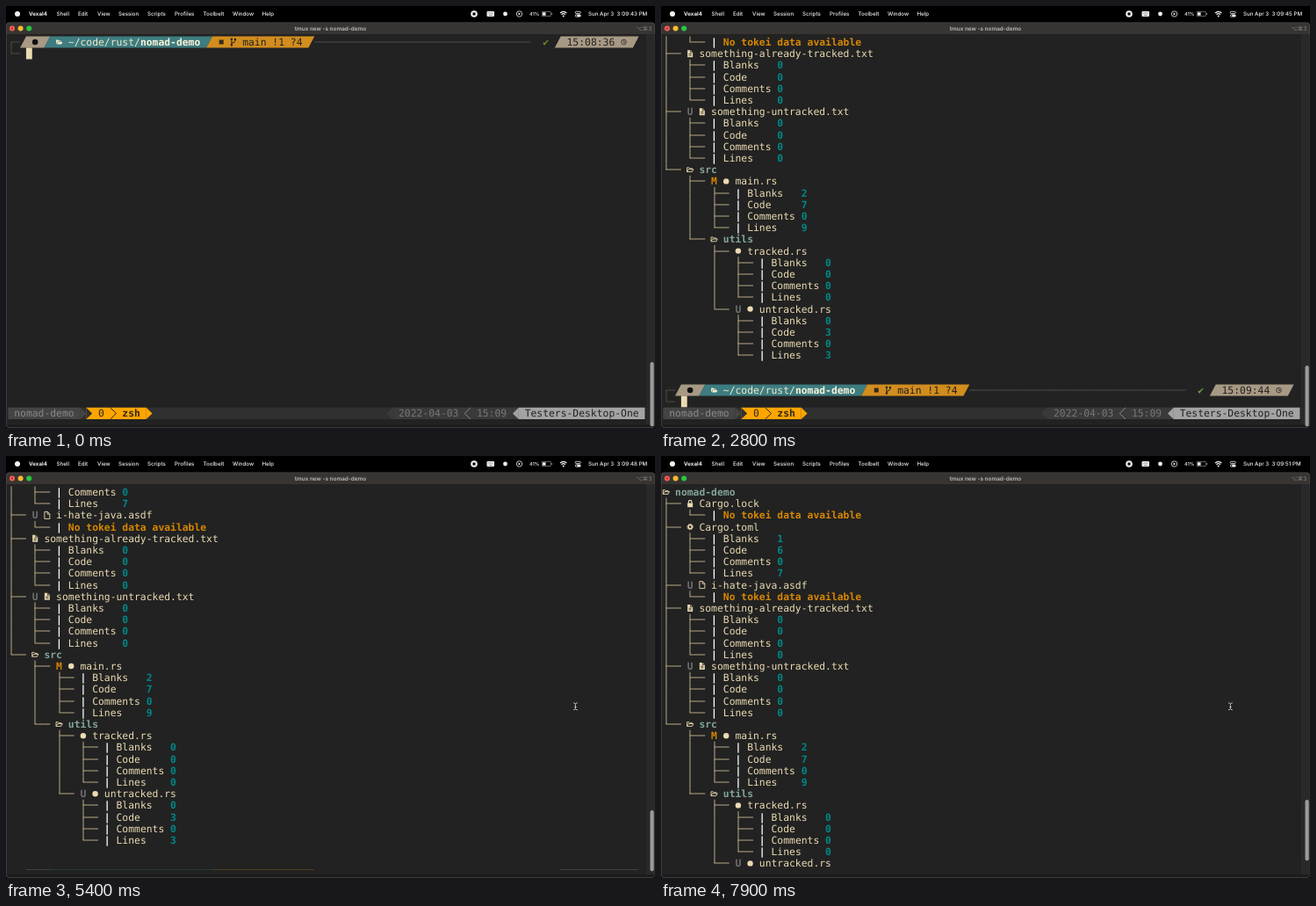
These frames come from a looping animation (739 by 480 pixels, 8000 ms). An HTML page with a canvas:

```html
<!DOCTYPE html>
<html lang="en">
<head>
<meta charset="utf-8">
<title>Terminal tree</title>
<style>
html, body { margin: 0; width: 100%; height: 100%; overflow: hidden; background: #000; }
canvas { display: block; }
</style>
</head>
<body>
<canvas id="stage" width="739" height="480"></canvas>
<script>
const ctx = document.getElementById('stage').getContext('2d');
ctx.textRendering = 'geometricPrecision';

const LOOP = 8000, OUTPUT_AT = 1200, MOUSE_AT = 4600;
const SCROLL_AT = [4700, 5100, 5400, 5700, 6000, 7250, 7450, 7600, 7750];
const CELL = 6.84, ROW = 13.2, LEFT = 2.4;
const MONO = '11.36px "DejaVu Sans Mono", monospace';
const FG = '#ebdbb2', BG = '#222222', ORANGE = '#d78700', TEAL = '#008787';
const colX = c => LEFT + c * CELL;
const midX = c => colX(c + .5);
const rowY = r => 41 + r * ROW;

// ---- file tree ----
const file = (icon, name, kids, mark) => ({ icon, name, kids, mark });
const dir = (name, ...kids) => ({ icon: 'folder', name, kids, bold: true });
const stats = (...values) => ['Blanks', 'Code', 'Comments', 'Lines']
  .map((label, i) => ({ label: label.padEnd(9), value: values[i] }));
const noData = [{ label: 'No tokei data available' }];

const root = dir('nomad-demo',
  file('lock', 'Cargo.lock', noData),
  file('gear', 'Cargo.toml', stats(1, 6, 0, 7)),
  file('page', 'i-hate-java.asdf', noData, 'U'),
  file('doc', 'something-already-tracked.txt', stats(0, 0, 0, 0)),
  file('doc', 'something-untracked.txt', stats(0, 0, 0, 0), 'U'),
  dir('src',
    file('dot', 'main.rs', stats(2, 7, 0, 9), 'M'),
    dir('utils',
      file('dot', 'tracked.rs', stats(0, 0, 0, 0)),
      file('dot', 'untracked.rs', stats(0, 3, 0, 3), 'U'))));

const lines = [{ ...root, tree: '' }];
(function walk(kids, prefix) {
  kids.forEach((kid, i) => {
    const last = i === kids.length - 1;
    lines.push({ ...kid, tree: prefix + (last ? '└── ' : '├── ') });
    walk(kid.kids || [], prefix + (last ? '    ' : '│   '));
  });
})(root.kids, '');

// ---- drawing helpers ----
function text(str, x, y, color, font) {
  ctx.font = font;
  ctx.fillStyle = color;
  ctx.fillText(str, x, y);
}
const put = (str, col, y, color, bold) =>
  text(str, colX(col), y + 4, color, (bold ? 'bold ' : '') + MONO);
const label = (str, x, y, color, size = 6.2, weight = 500) =>
  text(str, x, y, color, `${weight} ${size}px Inter, sans-serif`);

function rect(x, y, w, h, color, radius = 0) {
  ctx.fillStyle = color;
  ctx.beginPath();
  ctx.roundRect(x, y, w, h, radius);
  ctx.fill();
}
function disc(x, y, r, color) {
  ctx.fillStyle = color;
  ctx.beginPath();
  ctx.arc(x, y, r, 0, 7);
  ctx.fill();
}
function path(d, x, y, stroke, fill, width = 1) {
  const shape = new Path2D(d);
  ctx.save();
  ctx.translate(x, y);
  ctx.lineWidth = width;
  if (fill) { ctx.fillStyle = fill; ctx.fill(shape); }
  if (stroke) { ctx.strokeStyle = stroke; ctx.stroke(shape); }
  ctx.restore();
}
function poly(color, ...points) {
  ctx.fillStyle = color;
  ctx.beginPath();
  points.forEach(([x, y]) => ctx.lineTo(x, y));
  ctx.fill();
}
const ring = r => `M${r} 0A${r} ${r} 0 1 1 ${-r} 0A${r} ${r} 0 1 1 ${r} 0`;

function boxLines(str, col, y, color) {
  ctx.fillStyle = color;
  [...str].forEach((ch, i) => {
    const x = Math.round(midX(col + i)) - .5, top = y - ROW / 2;
    if ('│├└'.includes(ch)) ctx.fillRect(x, top, 1, ROW / 2);
    if ('│├┌'.includes(ch)) ctx.fillRect(x, y, 1, ROW / 2);
    if ('├└┌'.includes(ch)) ctx.fillRect(x, Math.round(y) - .5, colX(col + i + 1) - x, 1);
    if (ch === '─') ctx.fillRect(colX(col + i), Math.round(y) - .5, CELL, 1);
  });
}

const PAGE = 'M-3-4H.5L3-1.5V4H-3Z';
const icons = {
  folder: (x, y, c) => path('M-3.5 2.4V-2.4H-1.2L-.2-1.4H2.3V-.4M-3.5 2.4L-2-.4H3.7L2.3 2.4Z', x, y, c, null, .9),
  lock: (x, y, c) => {
    path('M-3-.6H3V4H-3Z', x, y, null, c);
    path('M-1.8-.5V-2A1.8 1.8 0 0 1 1.8-2V-.5', x, y, c, null, 1.2);
  },
  gear: (x, y, c) => {
    path(ring(2.1), x, y, c, null, 1.5);
    ctx.setLineDash([1.3, 1.2]);
    path(ring(3.2), x, y, c, null, 1);
    ctx.setLineDash([]);
  },
  page: (x, y, c) => path(PAGE + 'M.3-4V-1.3H3', x, y, c, null, .9),
  doc: (x, y, c) => {
    path(PAGE, x, y, null, c);
    path('M.5-4V-1.5H3M-1.6 .2H1.6M-1.6 2H1.6', x, y, BG, null, .8);
  },
  dot: (x, y, c) => disc(x, y, 3.2, c)
};

// ---- terminal parts ----
function treeLine(line, y) {
  let col = line.tree.length;
  boxLines(line.tree, 0, y, '#b9aa86');
  if (line.label) {
    const hasValue = line.value !== undefined;
    put('|', col, y, '#ffffff', true);
    put(line.label, col + 2, y, hasValue ? FG : ORANGE, !hasValue);
    if (hasValue) put(line.value, col + 11, y, TEAL, true);
    return;
  }
  if (line.mark) {
    put(line.mark, col, y, line.mark === 'M' ? ORANGE : '#707070', true);
    col += 2;
  }
  icons[line.icon](midX(col), y, FG);
  put(line.name, col + 2, y, line.bold ? '#83a598' : FG, line.bold);
}

function slab(from, to, y, color) {
  const top = y - ROW / 2, bottom = y + ROW / 2;
  poly(color, [colX(from + 1), top], [colX(to + 1), top], [colX(to), bottom], [colX(from), bottom]);
}

function prompt(row, time, check) {
  const y = rowY(row), dim = '#504d48';
  boxLines('┌─', 0, y, dim);
  boxLines('└─', 0, y + ROW, dim);
  slab(2, 6, y, '#a89984');
  slab(6, 33, y, '#3d7c80');
  slab(33, 50, y, '#d28d1e');
  disc(midX(4), y, 3.3, '#111');
  path('M-3.5 2.5V-2.6H-1L0-1.6H2.4V-.5H-1.8Z M-1.4 .1H4L2.6 2.6H-2.6Z', midX(8), y, null, '#f4e8c8');
  put('~/code/rust/', 10, y, '#f4e8c8');
  put('nomad-demo', 22, y, '#fbf1d7', true);
  rect(midX(35) - 2.5, y - 2.5, 5, 5, '#33291b');
  path('M-2-3V3M2-2.5V-1.5Q2 .5-2 1.5', midX(37), y, BG);
  [[-2, -3.4], [-2, 3.4], [2, -3]].forEach(([dx, dy]) => disc(midX(37) + dx, y + dy, 1.2, BG));
  put('main !1 ?4', 39, y, BG);
  boxLines('─'.repeat(36), 51, y, dim);
  put('✔', 89, y, check);
  slab(91, 104, y, '#a89984');
  put(time, 93, y, BG);
  path(ring(2.8) + 'M0-1.7V.3H1.5', midX(102), y, BG, null, .8);
  rect(colX(3), y + ROW / 2, CELL, ROW - .4, FG);
}

function arrow(col, y, dir, color, filled = true) {
  const x = dir > 0 ? colX(col) : colX(col + 1), tip = x + dir * CELL, h = ROW / 2;
  if (filled) poly(color, [x, y - h], [tip, y], [x, y + h]);
  else path(`M${x} ${y - h}L${tip} ${y}L${x} ${y + h}`, 0, 0, color);
}

function statusBar(row) {
  const y = rowY(row), bar = '#303030', soft = '#444444', amber = '#ffa500', pale = '#a3a3a3';
  const block = (from, to, color) =>
    rect(colX(from), y - ROW / 2, (to - from) * CELL, ROW, color);
  block(0, 106, bar);
  block(0, 12, soft);
  arrow(12, y, 1, soft);
  put('nomad-demo', 1, y, '#898989');
  block(13, 23, amber);
  arrow(13, y, 1, bar);
  arrow(23, y, 1, amber);
  put('0', 15, y, '#302818');
  arrow(17, y, 1, '#302818', false);
  put('zsh', 19, y, '#302818', true);
  arrow(63, y, -1, '#3a3a3a');
  block(64, 84, '#3a3a3a');
  put('2022-04-03', 65, y, '#777777');
  arrow(76, y, -1, '#898989', false);
  put('15:09', 78, y, '#777777');
  block(84, 85, '#3a3a3a');
  arrow(84, y, -1, pale);
  block(85, 106, pale);
  put('Testers-Desktop-One', 86, y, BG);
}

// ---- desktop parts ----
const menu = [['Shell', 57.5], ['Edit', 82], ['View', 104], ['Session', 128], ['Scripts', 161],
  ['Profiles', 192], ['Toolbelt', 224.5], ['Window', 258], ['Help', 291.5]];

function menuBar(t) {
  const white = '#f2f2f2', y = 9;
  rect(0, 0, 739, 18, '#000');
  disc(13, y, 3, white);
  label('Vexal4', 26, 11.2, white, 6.2, 700);
  menu.forEach(([name, x]) => label(name, x, 11.2, white));
  disc(533, y, 3.8, white);
  rect(531.5, 7.5, 3, 3, '#000');
  rect(547.5, 6, 8.5, 6, white, 1);
  path('M-3-1H3M-2 1.5H2', 551.7, y, '#555', null, .6);
  disc(568.5, y, 2.4, white);
  path(ring(3.2), 584.5, y, white, null, .8);
  path('M-1-1.5L1.6 0L-1 1.5Z', 584.5, y, null, white);
  label('41%', 596, 11, white, 5.6);
  path('M-5-2.5H5V2.5H-5Z', 615.2, y, '#888', null, .7);
  rect(611, 7.3, 3.6, 3.4, white);
  rect(621, 8, 1, 2, '#888');
  path('M-3.7-1Q0-4.4 3.7-1M-2.2 .7Q0-1.4 2.2 .7', 634.7, y, white, null, 1.2);
  disc(634.7, 11.4, 1, white);
  path('M-2-2.7H2A1 1 0 0 1 2-.5H-2A1 1 0 0 1-2-2.7', 651.3, y, white, null, .8);
  rect(648, 9.6, 6.6, 3, white, 1.5);
  disc(649.6, 11.1, .9, '#000');
  const second = 43 + Math.floor((t + 150) / 1000);
  label(`Sun Apr 3  3:09:${second} PM`, 663, 11.2, white);
}

function windowFrame() {
  rect(0, 18.5, 739, 461.5, '#4b4846', 4);
  rect(.8, 19.3, 737.6, 460, '#373432', 4);
  rect(.8, 32, 737.6, 447.2, BG, [0, 0, 4, 4]);
  rect(729.5, 32, 9, 445, '#292929');
  rect(729.5, 32, .7, 445, '#303030');
  rect(1, 476, 737, 3, '#1c1c1c', [0, 0, 4, 4]);
  ['#ff5f57', '#febc2e', '#28c840'].forEach((c, i) => disc(7 + i * 9.6, 25.5, 3, c));
  disc(7, 25.5, .9, '#7a1b16');
  ctx.textAlign = 'center';
  label('tmux new -s nomad-demo', 369.5, 27.8, '#c0bebc', 6.4, 600);
  ctx.textAlign = 'left';
  text('⌥⌘3', 717.5, 27.6, '#858280', '6.4px "DejaVu Sans", sans-serif');
}

function draw(t) {
  const ready = t >= OUTPUT_AT;
  const scroll = SCROLL_AT.filter(at => t >= at).length;
  ctx.fillStyle = '#000';
  ctx.fillRect(0, 0, 739, 480);
  menuBar(t);
  windowFrame();

  ctx.save();
  ctx.beginPath();
  ctx.rect(0, 34, 729, 436.2);
  ctx.clip();
  if (ready) {
    lines.forEach((line, i) => {
      const row = i - 9 + scroll;
      if (row >= 0 && row <= 32) treeLine(line, rowY(row));
    });
    prompt(30 + scroll, '15:09:44', scroll ? '#b5862a' : '#6f9a4a');
  } else {
    prompt(0, '15:08:36', '#7c8a28');
  }
  statusBar(32 + scroll);
  ctx.restore();

  const top = ready ? 409 - 2 * scroll : 405;
  rect(733.5, top, 4.2, ready ? 69.3 : 73.3, '#9b9b9b', 2.1);

  if (t >= MOUSE_AT) {
    const p = Math.min(1, Math.max(0, (t - 4800) / 500));
    const beam = 'M-2.4-4Q0-4 0-2.5V2.5Q0 4-2.4 4M2.4-4Q0-4 0-2.5M2.4 4Q0 4 0 2.5M-1.2 .8H1.2';
    path(beam, 648 + p * .4, 284 + p * .8, '#111', null, 2);
    path(beam, 648 + p * .4, 284 + p * .8, '#c8c8c8', null, 1);
  }
}

(function tick() {
  draw(performance.now() % LOOP);
  requestAnimationFrame(tick);
})();
</script>
</body>
</html>
```
